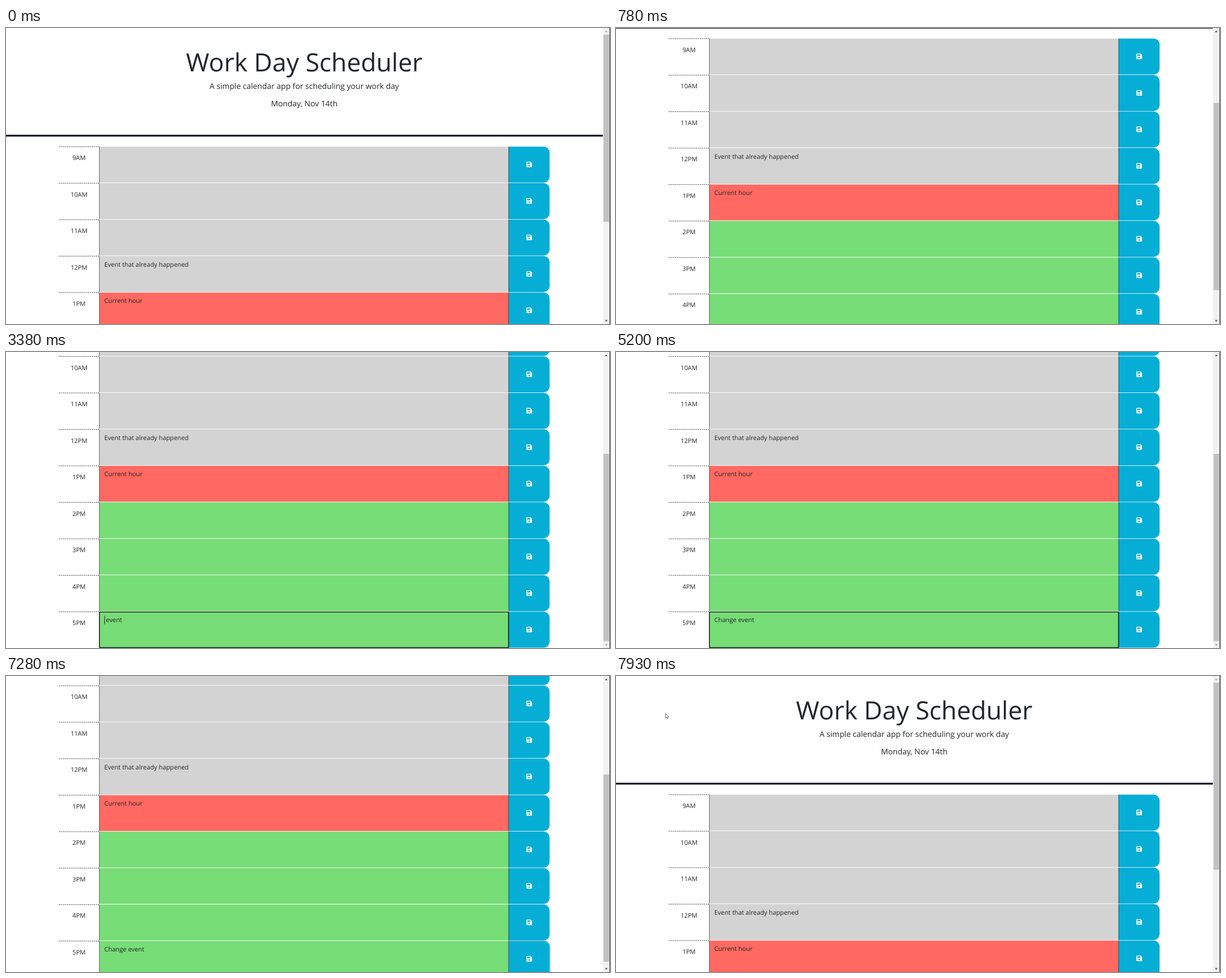
Write an HTML page that moves like this. It is 1000 px wide and 491 px high and loops after 8000 ms.

```html
<!DOCTYPE html>
<html lang="en">
<head>
<meta charset="utf-8">
<title>Work Day Scheduler</title>
<style>
  html, body { margin: 0; width: 100%; height: 100%; overflow: hidden; background: #fff; }
  svg { display: block; width: 1000px; height: 491px; }
  text { font: 10.42px "Open Sans", sans-serif; fill: #212529; white-space: pre; text-rendering: geometricPrecision; }
  .mid { text-anchor: middle; }
  .title { font-size: 41.65px; }
  .lead { font-size: 13.02px; }
  .past { fill: #d3d3d3; }
  .present { fill: #ff6961; }
  .future { fill: #77dd77; }
</style>
</head>
<body>
<svg viewBox="0 0 1000 491">
  <g id="page">
    <text class="mid title" x="493.8" y="72">Work Day Scheduler</text>
    <text class="mid lead" x="493.8" y="100.6">A simple calendar app for scheduling your work day</text>
    <text class="mid lead" x="493.8" y="130.4">Monday, Nov 14th</text>
    <rect y="177" width="988.5" height="3.2" fill="#22252f"/>
    <g id="rows"></g>
    <path id="ring" fill="none" stroke="#7d93b5" stroke-opacity=".4" stroke-width="2"
      d="M831.5 680.2H890.5a10.5 10.5 0 0 1 10.5 10.5V730a10.5 10.5 0 0 1-10.5 10.5H831.5Z"/>
    <rect id="focus" x="154.6" y="681.4" width="677.5" height="59" rx="1" fill="none" stroke="#111" stroke-width="1.3"/>
    <rect id="mark" y="687.7" height="14" fill="#0078d7"/>
    <text id="entry" x="162.8" y="698.4"></text>
    <rect id="caret" y="687.7" width=".9" height="14" fill="#222"/>
  </g>
  <rect x="988.5" width="11.5" height="491" fill="#f1f1f1"/>
  <rect id="thumb" x="989.2" width="9.3" height="310.5" fill="#c1c1c1"/>
  <path id="up" d="M991.6 7L993.8 4.2L996 7Z"/>
  <path id="down" d="M991.6 484.6L993.8 487.4L996 484.6Z"/>
  <rect x="999.2" width=".8" height="491" fill="#222"/>
  <path id="pointer" d="M0 0V8.2L1.9 6.5L3.1 9L4.3 8.4L3.1 6H5.6Z" fill="#fff" stroke="#444" stroke-width=".7"/>
</svg>
<script>
const LOOP = 8000, TOP = 196.6, PITCH = 60.5, END = 250, TEXT_X = 162.8;
const el = id => document.getElementById(id);
const show = (node, on) => node.setAttribute('visibility', on ? 'visible' : 'hidden');

const hours = ['9AM', '10AM', '11AM', '12PM', '1PM', '2PM', '3PM', '4PM', '5PM'];
const events = { '12PM': 'Event that already happened', '1PM': 'Current hour' };

el('rows').innerHTML = hours.map((hour, i) => {
  const tense = i < 4 ? 'past' : i === 4 ? 'present' : 'future';
  return `<g transform="translate(0 ${TOP + i * PITCH})">
    <path d="M87.3 .3H154.6" stroke="#333" stroke-width=".9" stroke-dasharray="1.95 1.3"/>
    <text class="mid" x="120.9" y="22.6">${hour}</text>
    <rect class="${tense}" x="154.4" y=".2" width="678" height="59.6"/>
    <path d="M154.6 .2V59.8" stroke="#555" stroke-width=".8"/>
    <text x="${TEXT_X}" y="17.9">${events[hour] || ''}</text>
    <path fill="#06aed5" d="M832.2 .2H890.3a9.7 9.7 0 0 1 9.7 9.7V50.1a9.7 9.7 0 0 1-9.7 9.7H832.2Z"/>
    <path d="M832.3 .2V59.8" stroke="#222" stroke-width=".7"/>
    <g transform="translate(866.2 29.7)">
      <path fill="#fff" d="M-3.6-4.6H2.4L4.6-2.4V3.6a1 1 0 0 1-1 1H-3.6a1 1 0 0 1-1-1V-3.6a1 1 0 0 1 1-1Z"/>
      <path fill="#06aed5" d="M-3.2-3.3H1.9V-.9H-3.2Z"/>
      <circle cy="1.9" r="1.3" fill="#06aed5"/>
    </g>
  </g>`;
}).join('');

// Each track lists [start time, value...]; a value holds until the next entry.
const scrollTrack = [[0, 0], [650, 70], [780, 179.2], [910, END], [7280, 241.2], [7410, 120], [7540, 0]];

// [time, text, caret index (-1 = off), selection start, selection end]
const entryTrack = [
  [0, 'New event', -1],
  [2210, 'New event', 3],
  [2340, 'New event', -1, 1, 3],
  [2470, 'New event', -1, 0, 3],
  [3380, ' event', 0],
  [3900, ' event', -1],
  ...['C', 'Ch', 'Cha', 'Chang', 'Change'].map((word, i) => [4160 + i * 130, word + ' event', word.length]),
  [5200, 'Change event', -1],
  [5850, 'Change event', 6],
  [6370, 'Change event', -1]
];
const pointerTrack = [[0], [7800, 97, 43], [7930, 82, 62]];

const at = (track, t) => track.findLast(step => step[0] <= t);
const widthTo = n => n ? el('entry').getSubStringLength(0, n) : 0;

function drawEntry(t) {
  const [, text, caret, from = 0, to = 0] = at(entryTrack, t);
  el('entry').innerHTML = text.slice(0, from) +
    `<tspan fill="#fff">${text.slice(from, to)}</tspan>` + text.slice(to);
  const x = TEXT_X + widthTo(from);
  el('mark').setAttribute('x', x);
  el('mark').setAttribute('width', TEXT_X + widthTo(to) - x);
  show(el('caret'), caret >= 0);
  if (caret >= 0) el('caret').setAttribute('x', TEXT_X + widthTo(caret));
  show(el('focus'), t >= 2210 && t < 6500);
  show(el('ring'), t >= 6500);
}

function drawScroll(t) {
  const y = at(scrollTrack, t)[1];
  el('page').setAttribute('transform', `translate(0 ${-y})`);
  el('thumb').setAttribute('y', 11 + y * 0.632);
  el('up').setAttribute('fill', y > 0 ? '#505050' : '#a3a3a3');
  el('down').setAttribute('fill', y < END ? '#505050' : '#a3a3a3');
}

function drawPointer(t) {
  const [, x, y] = at(pointerTrack, t);
  show(el('pointer'), x !== undefined);
  if (x !== undefined) el('pointer').setAttribute('transform', `translate(${x} ${y})`);
}

const start = performance.now();
function frame() {
  const t = (performance.now() - start) % LOOP;
  drawScroll(t);
  drawEntry(t);
  drawPointer(t);
  requestAnimationFrame(frame);
}
frame();
</script>
</body>
</html>
```
